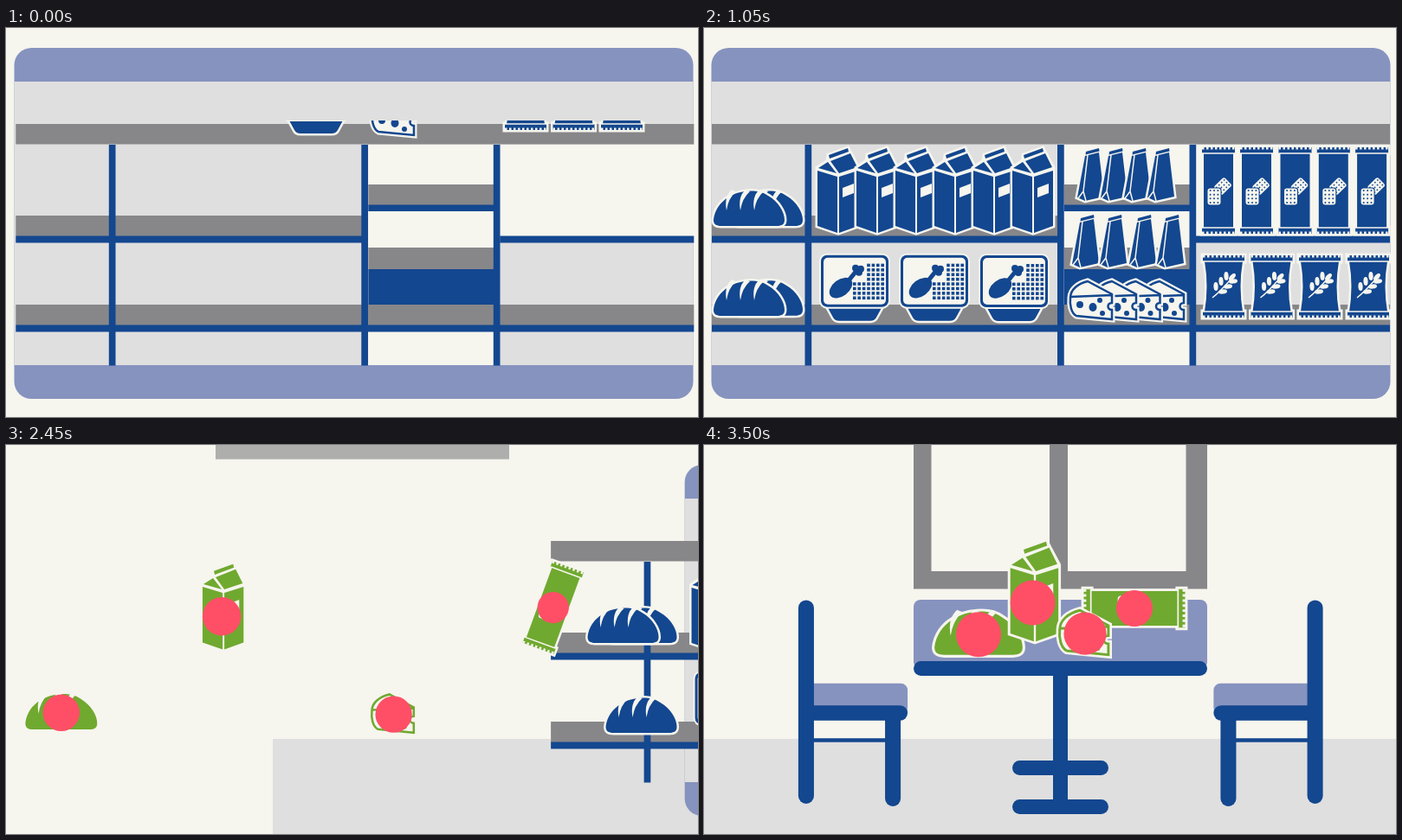
An HTML page with a canvas that plays this animation: 799 px wide and 450 px high, repeating every 3.57 s.

```html
<!DOCTYPE html>
<html lang="en">
<head>
<meta charset="utf-8">
<title>From shelf to table</title>
<style>
html, body { margin: 0; width: 100%; height: 100%; overflow: hidden; background: #f6f5ee; }
canvas { display: block; }
</style>
</head>
<body>
<canvas id="stage" width="799" height="450"></canvas>
<script>
const ctx = document.getElementById('stage').getContext('2d');
const LOOP = 3570, STEP = 70;
const CREAM = '#f6f5ee', BLUE = '#13478f', GREEN = '#70a92f', PINK = '#ff4f66';
const LILAC = '#8693bf', LIGHT = '#dfdfdf', GREY = '#87878a';

const clamp = v => Math.max(0, Math.min(1, v));
const mix = (a, b, p) => a + (b - a) * p;
const inOut = u => u < .5 ? 4 * u ** 3 : 1 - 4 * (1 - u) ** 3;
const spring = age => age <= 0 ? 0 : 1 - Math.exp(-age / 140) * Math.cos(age * Math.PI / 290);
const slide = (t, start, dist, span, power) => dist * (Math.max(0, t - start) / span) ** power;

function box(x, y, w, h, color, r = 0) {
  ctx.fillStyle = color;
  ctx.beginPath();
  ctx.roundRect(x, y, w, h, r);
  ctx.fill();
}
function fill(d, color) {
  ctx.fillStyle = color;
  ctx.fill(new Path2D(d));
}
function line(d, color, width) {
  ctx.strokeStyle = color;
  ctx.lineWidth = width;
  ctx.stroke(new Path2D(d));
}
function halo(d) {
  line(d, CREAM, 5);
  fill(d, CREAM);
}
function dot(x, y, rx, color, ry = rx, turn = 0) {
  ctx.fillStyle = color;
  ctx.beginPath();
  ctx.ellipse(x, y, rx, ry, turn, 0, 7);
  ctx.fill();
}
function at(x, y, draw, sx = 1, sy = sx, turn = 0) {
  ctx.save();
  ctx.translate(x, y);
  ctx.rotate(turn);
  ctx.scale(sx, sy);
  draw();
  ctx.restore();
}

// Products, each drawn around its own centre
function bread(c) {
  const loaf = 'M-41 13C-40 2-33-8-24-13C-13-21 10-24 22-15C34-8 41 4 41 13C41 18 38 20 32 20H-32C-38 20-41 18-41 13Z';
  halo(loaf);
  fill(loaf, c);
  for (const x of [-20, -4, 12]) fill(`M${x}-22q-9 8-6 24q2-14 11-22z`, CREAM);
}
function milk(c) {
  halo('M-24-26L-12-34L-11-41L11-49L14-43L23-26V41L0 49L-24 41Z');
  fill('M-11-41L11-49L12-45L-10-37ZM-23-26L-12-33L-2-20ZM-9-34L14-43L22-27L1-20ZM-24-23L-1-16V49L-24 41ZM1-16L23-23V41L1 49Z', c);
  fill('M5-3L18-8V3L5 8Z', CREAM);
}
function tray(c) {
  const base = 'M-31 23H31L25 34Q23 38 18 38H-18Q-23 38-25 34Z';
  halo(base);
  fill(base, BLUE);
  box(-41, -40, 82, 64, CREAM, 9);
  box(-39, -38, 78, 60, BLUE, 7);
  box(-36, -35, 72, 54, CREAM, 5);
  dot(-16, 0, 15, c, 9.5, -.65);
  line('M-9-6L3-21', c, 5);
  dot(1, -23, 4, c);
  dot(7, -22, 4, c);
  dot(5, -18, 4, c);
  for (let row = 0; row < 8; row++)
    for (let col = row < 4 ? 3 : 0; col < 7; col++)
      box(col * 5.4 - 2, row * 5.4 - 28, 3.6, 3.6, c);
}
function bag(c) {
  const body = 'M-6-22L10-26L16 25L-6 30L-15 26Z', fin = 'M-5-27L10-31L10.5-27.5L-5.5-23.5Z';
  halo(body);
  halo(fin);
  fill(body + fin, c);
  line('M-3-23L-8 19M-14 27L-8 19L-5 30', CREAM, 1.5);
}
function cheese(c) {
  const wedge = 'M-25-3C-25-12-17-19-5-22L23-7V3C17 3 17 11 23 11V22L-18 18C-24 15-26 5-25-3Z';
  line(wedge, CREAM, 7);
  fill(wedge, CREAM);
  line(wedge + 'M-25-4L23-6', c, 2.5);
  dot(-14, 5, 4, c);
  dot(1, 8, 4.5, c, 5);
  dot(9, 0, 3, c);
  dot(12, 15, 3, c);
}
// w: half width at the crimped ends, h: half height, waist: inset of the sides
function pack(w, h, waist, c) {
  const s = w - 2, e = h - 7;
  const body = `M${-s} ${-e}H${s}Q${s - waist} 0 ${s} ${e}H${-s}Q${waist - s} 0 ${-s} ${-e}Z`;
  const ends = `M${-w} ${-h}H${w}V${-e}H${-w}ZM${-w} ${e}H${w}V${h}H${-w}Z`;
  halo(body);
  halo(ends);
  fill(body + ends, c);
  for (const side of [-1, 1]) {
    line(`M${-w} ${side * e}H${w}`, CREAM, 1.5);
    ctx.setLineDash([2.5, 2.5]);
    line(`M${-w} ${side * (h - 1)}H${w}`, CREAM, 3);
    ctx.setLineDash([]);
  }
}
function cracker(c) {
  box(-7.5, -9.5, 15, 19, CREAM, 3);
  for (let i = 0; i < 12; i++) dot(i % 3 * 4.4 - 4.4, (i / 3 | 0) * 4.6 - 6.9, 1, c);
}
function cookies(c) {
  pack(19, 50, 0, c);
  at(5, -5, () => cracker(c), .9, .9, .8);
  at(-5, 7, () => { box(-8.5, -10.5, 17, 21, c, 3); cracker(c); });
}
function cereal(c) {
  pack(24, 36, 5, c);
  line('M-13 13Q-4 6 8-8', CREAM, 1.5);
  for (let i = 0; i < 3; i++) {
    const x = i * 6 - 6, y = 4 - i * 6;
    dot(x - 3, y - 4, 5, CREAM, 2.6, -1.6);
    dot(x + 5, y + 2, 5, CREAM, 2.6, -.1);
  }
  dot(10, -11, 5, CREAM, 2.6, -.85);
}

// lag: height above the shelf 630 ms into the loop
// mark: disc position and radius; goal: place and scale on the table
const items = [];
const add = (draw, x, y, lag, mark, goal) => items.push({ draw, x, y, lag, mark, goal });
const row = (draw, x, gap, count, y, lag) => {
  for (let i = 0; i < count; i++) add(draw, x + gap * i, y, lag);
};
row(bread, 73, -21, 2, 209, 20);
add(bread, 73, 313, 60);
add(bread, 52, 313, 27, [0, 1, 21], [317, 218, 1.24]);
row(tray, 174, 92, 2, 301, 61);
add(tray, 358, 301, 15, [-1, -3, 33]);
row(milk, 155, 45, 2, 188, 21);
add(milk, 245, 188, 44, [-2, 11, 22], [382, 169.5, 1.18]);
row(milk, 290, 45, 3, 188, 22);
row(bag, 446, 27, 4, 170, 44);
add(bag, 440, 247, 22);
add(bag, 472, 247, 13, [-1, -3, 15]);
row(bag, 506, 32, 2, 247, 22);
add(cookies, 594, 188, 21);
add(cookies, 638, 188, 33, [0, 0, 18], [497, 189, 1.17]);
row(cookies, 682.5, 44.3, 3, 188, 21);
row(cereal, 600, 55.5, 3, 299, 15);
add(cereal, 767, 299, 28, [1, 1, 20]);
row(cheese, 531, -27.5, 3, 315, 27);
add(cheese, 448, 315, 14, [0, 1, 21], [440, 217, 1.17]);

function drawItem(item, t, shift) {
  const { draw, x, y, lag, mark, goal } = item;
  const left = Math.max(0, 855 * Math.sqrt(lag / 217) + 630 - t);
  const drop = 217 * (left / 855) ** 2;
  const u = goal ? clamp((t - 2265) / 828) : 0, p = inOut(u);
  const [gx, gy, size] = goal || [x, y, 1];
  const turn = draw === cookies ? u * Math.PI / 2 : 0;
  at(mix(x, gx, p) + (goal ? 0 : shift), mix(y, gy, p) - drop, () => {
    const pop = mark ? clamp((t - 1190) / 280) : 0;
    draw(pop > 0 ? GREEN : BLUE);
    if (pop > 0) dot(mark[0], mark[1], mark[2] * (1 - (1 - pop) ** 3), PINK);
  }, mix(1, size, p), mix(1, size, p), turn);
}

function cabinet() {
  box(8.5, 23, 784, 406, LILAC, 20);
  box(8.5, 62, 784, 328, LIGHT);
}
function shelves() {
  box(416, 135, 145, 255, CREAM);
  box(568, 135, 224, 106, CREAM);
  box(9, 111, 783, 23.5, GREY);
  box(9, 217, 400, 24, GREY);
  box(9, 320, 783, 24, GREY);
  box(416, 181, 145, 24, GREY);
  box(416, 254, 145, 25, GREY);
  box(9, 240.5, 400, 8, BLUE);
  box(568, 240.5, 224, 8, BLUE);
  box(9, 343.5, 783, 8, BLUE);
  box(416, 204.5, 145, 7.5, BLUE);
  box(416, 279, 145, 41, BLUE);
  for (const x of [116.5, 408, 560.5]) box(x, 135, 7.7, 255.5, BLUE);
}
function windowFrame() {
  fill('M242-200V166.5H581V-200ZM262.5-200H399V146H262.5ZM420-200H556.5V146H420Z', 'transparent');
  ctx.fillStyle = GREY;
  ctx.fill(new Path2D('M242-200V166.5H581V-200ZM262.5-200H399V146H262.5ZM420-200H556.5V146H420Z'), 'evenodd');
}
function table() {
  box(-169.5, -239, 339, 80, LILAC, 8);
  box(-169.5, -168, 339, 17, BLUE, 8.5);
  box(-8.5, -155, 17, 150, BLUE);
  box(-55.5, -53, 111, 17, BLUE, 8.5);
  box(-55.5, -8, 111, 17, BLUE, 8.5);
}
function chair() {
  box(-54, -140, 117, 36, LILAC, 8);
  box(-54, -76.5, 100, 4.5, BLUE);
  box(37, -108, 18, 110, BLUE, 9);
  box(-54, -114.5, 117, 17.5, BLUE, 8.7);
  box(-63, -236, 18, 235, BLUE, 9);
}

function render(t) {
  box(0, 0, 799, 450, CREAM);
  box(800 * (1 - inOut(clamp((t - 2067) / 707))), 340, 800, 110, LIGHT);

  const u = clamp((t - 2212) / 822);
  ctx.globalAlpha = clamp(u * 2.2);
  at(0, 166 * (inOut(u) - 1), windowFrame);
  ctx.globalAlpha = 1;

  const settle = clamp(1 - t / 300);
  at(settle + slide(t, 1750, 433, 420, 1.14), 0, cabinet);
  at(2.3 * settle + slide(t, 1820, 266, 350, 1.44), 0, shelves);

  at(411.5, 418, table, spring(t - 2473), spring(t - 2520));
  const grow = spring(t - 2650);
  if (grow) {
    const wide = mix(1, grow, .67);
    at(172, 416, chair, wide, grow);
    at(651.5, 416, chair, -wide, grow);
  }

  ctx.save();
  ctx.beginPath();
  ctx.rect(0, Math.max(0, 107 - t * .14), 799, 450);
  ctx.clip();
  const shift = slide(t, 2030, 41, 140, 2.53);
  // Chosen products stay put while the rest pass in front of them
  const behind = i => t > 2100 && i.goal && i.draw !== cheese;
  items.filter(behind).forEach(i => drawItem(i, t, shift));
  items.filter(i => !behind(i)).forEach(i => drawItem(i, t, shift));
  ctx.restore();
}

function tick(now) {
  render(Math.floor(now % LOOP / STEP) * STEP);
  requestAnimationFrame(tick);
}
requestAnimationFrame(tick);
</script>
</body>
</html>
```
